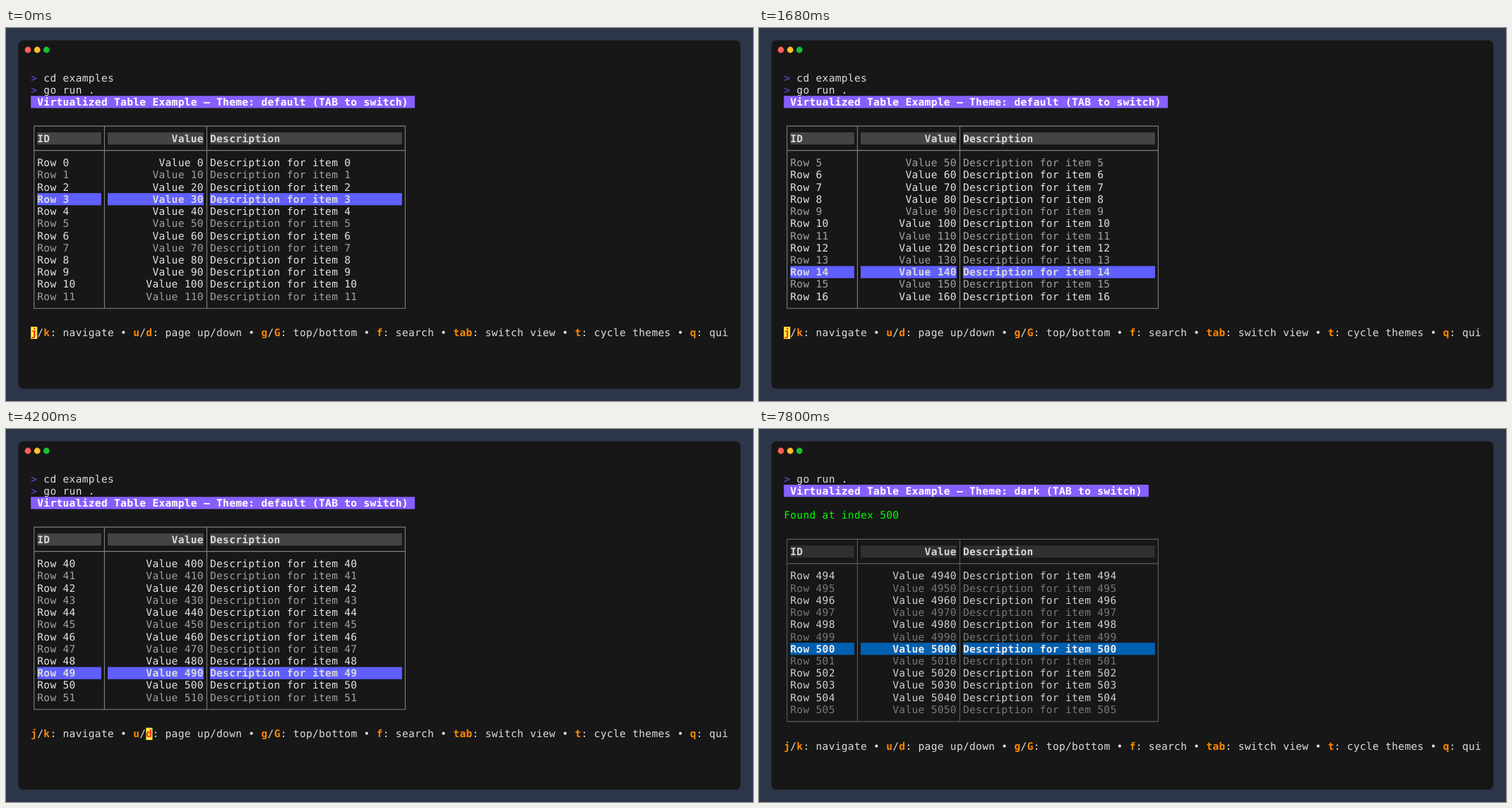
Recreate the animation shown at these times as an HTML page. Size 1058x529 px, loop 8000 ms.

```html
<!DOCTYPE html>
<html lang="en">
<head>
<meta charset="utf-8">
<title>Virtualized table</title>
<style>
html, body { margin: 0; width: 100%; height: 100%; overflow: hidden; background: #2d3548; }
svg { display: block; width: 1058px; height: 529px; }
text {
  font: 14.55px "DejaVu Sans Mono", monospace;
  letter-spacing: .305px;
  white-space: pre;
  text-rendering: geometricPrecision;
}
.b { font-weight: bold; }
</style>
</head>
<body>
<svg viewBox="0 0 1058 529">
  <rect x="17.5" y="17.5" width="1022.7" height="494" rx="7" fill="#171717"/>
  <circle cx="31" cy="31" r="4.4" fill="#ff5f58"/>
  <circle cx="44.2" cy="31" r="4.4" fill="#ffbd2e"/>
  <circle cx="57.3" cy="31" r="4.4" fill="#18c132"/>
  <g id="screen"></g>
</svg>
<script>
const LOOP = 8000, TICK = 40, FLASH = 126.5;
const CW = 9.064, CH = 17.235, X0 = 35.2, Y0 = 61.8;
const ROWS = 12, FG = '#dddddd';
const HELP = [['j/k', 'navigate'], ['u/d', 'page up/down'], ['g/G', 'top/bottom'], ['f', 'search'],
  ['tab', 'switch view'], ['t', 'cycle themes'], ['q', 'qui']];
const THEMES = {
  default: { line: '#808080', head: '#444444', headText: '#d8d8d8', even: '#e4e4e4', odd: '#a2a2a2', sel: '#5f5fff', selText: '#d8d8d8' },
  dark: { line: '#5c5c5c', head: '#303030', headText: '#d8d8d8', even: '#d0d0d0', odd: '#787878', sel: '#005faf', selText: '#eeeeee' }
};

// Times of the "j" key: three slow presses, then key repeat.
const presses = [-20, 140, 300];
for (let n = 0; n < 20; n++) presses.push(1084.9 + 69.8 * n);

const px = c => X0 + c * CW;
const py = r => Y0 + r * CH;
const esc = s => s.replace(/&/g, '&amp;').replace(/</g, '&lt;').replace(/>/g, '&gt;');
const fill = (c, r, w, color) =>
  `<rect x="${px(c)}" y="${py(r)}" width="${w * CW}" height="${CH}" fill="${color}"/>`;
const text = (c, r, s, color = FG, bold = false) =>
  `<text x="${px(c)}" y="${py(r) + 13.7}" fill="${color}"${bold ? ' class="b"' : ''}>${esc(s)}</text>`;

// Every press schedules its own clear, so an older clear can end a newer flash.
function jState(t) {
  const n = presses.filter(p => p <= t).length - 1;
  const last = presses[n], before = (presses[n - 1] ?? -1e4) + FLASH;
  const cleared = t >= last + FLASH || (before > last && t >= before);
  return { sel: 3 + n, lit: !cleared };
}

function stateAt(t) {
  const s = { sel: 0, top: 0, lit: '', mode: 'table', typed: '', theme: 'default' };
  const within = (a, b) => t >= a && t < b;
  const j = jState(t);
  s.sel = j.sel;
  if (j.lit) s.lit = 'j';
  if (t >= 3480) s.sel += ROWS;
  if (t >= 4200) s.sel += ROWS;
  s.top = Math.max(0, s.sel - 9);
  if (within(3480, 3640) || within(4200, 4320)) s.lit = 'd';
  if (t >= 4880) {
    s.mode = 'search';
    if (t < 4960) s.lit = 'f';
    s.typed = '500'.slice(0, Math.max(0, Math.floor((t - 5520) / TICK)));
  }
  if (t >= 6320) {
    s.mode = 'found';
    s.sel = 500;
    s.top = 494;
  }
  if (t >= 7640) {
    s.theme = 'dark';
    if (t < 7800) s.lit = 't';
  }
  return s;
}

function cells(r, vals, color, bold, bg) {
  const [id, value, desc] = vals;
  const back = bg ? fill(1, r, 10, bg) + fill(12, r, 15, bg) + fill(28, r, 30, bg) : '';
  return back + text(1, r, id, color, bold) +
    text(27 - value.length, r, value, color, bold) + text(28, r, desc, color, bold);
}

function table(r, s) {
  const th = THEMES[s.theme];
  const mid = n => py(n) + CH / 2 - .2;
  const cx = c => px(c) + CW / 2;
  const a = mid(r), b = mid(r + 2), z = mid(r + 15);
  let path = `M${cx(0)} ${a}H${cx(58)}V${z}H${cx(0)}ZM${cx(0)} ${b}H${cx(58)}`;
  for (const c of [11, 27]) path += `M${cx(c)} ${a}V${z}`;
  let out = `<path d="${path}" fill="none" stroke="${th.line}" stroke-width="1.1"/>`;
  out += cells(r + 1, ['ID', 'Value', 'Description'], th.headText, true, th.head);
  for (let i = 0; i < ROWS; i++) {
    const n = s.top + i, on = n === s.sel;
    // The two scroll threshold rows are always bright.
    const bright = n % 2 === 0 || i === 2 || i === 9;
    const color = on ? th.selText : bright ? th.even : th.odd;
    out += cells(r + 3 + i, ['Row ' + n, 'Value ' + n * 10, 'Description for item ' + n], color, on, on && th.sel);
  }
  return out;
}

function help(r, lit) {
  let c = 0, out = '';
  HELP.forEach(([keys, label], i) => {
    if (i) {
      out += text(c, r, ' • ');
      c += 3;
    }
    for (const k of keys.split(/(\/)/)) {
      const on = k === lit;
      if (on) out += fill(c, r, 1, '#ffef3c');
      out += text(c, r, k, on ? '#ff2a1a' : k === '/' ? FG : '#ff8700', k !== '/');
      c += k.length;
    }
    out += text(c, r, ': ' + label);
    c += label.length + 2;
  });
  return out;
}

function searchBox(r, typed) {
  const frame = `<rect x="${px(.5)}" y="${py(r + .5)}" width="${35 * CW}" height="${2 * CH}" rx="4" fill="none" stroke="#5f5fff" stroke-width="1.1"/>`;
  const hint = 'Enter row number...';
  const at = 14 + typed.length;
  let out = frame + text(2, r + 1, 'Search for: ') + fill(at, r + 1, 1, FG);
  if (typed) out += text(14, r + 1, typed);
  else out += text(14, r + 1, hint[0], '#171717') + text(15, r + 1, hint.slice(1), '#626262');
  return out;
}

function draw(s) {
  const command = (r, cmd) => text(0, r, '>', '#5a56e0') + text(2, r, cmd);
  const first = s.mode === 'table';
  let r = 0, out = '';
  if (first) out += command(r++, 'cd examples');
  out += command(r++, 'go run .');
  const title = ` Virtualized Table Example – Theme: ${s.theme} (TAB to switch) `;
  out += fill(0, r, title.length, '#875fff') + text(1, r, title.trim(), '#ffffff', true);
  r += 2;
  if (s.mode === 'search') {
    out += searchBox(r, s.typed);
    r += 4;
  } else if (s.mode === 'found') {
    out += text(0, r, 'Found at index 500', '#00ff00');
    r += 2;
  } else {
    r += 0;
  }
  if (first) return out + table(4, s) + help(21, s.lit);
  return out + table(r, s) + help(r + 17, s.lit);
}

const screen = document.getElementById('screen');
let shown = '';
function frame() {
  const t = performance.now() % LOOP;
  const s = stateAt(Math.floor(t / TICK) * TICK);
  const key = JSON.stringify(s);
  if (key !== shown) {
    shown = key;
    screen.innerHTML = draw(s);
  }
  requestAnimationFrame(frame);
}
frame();
</script>
</body>
</html>
```
